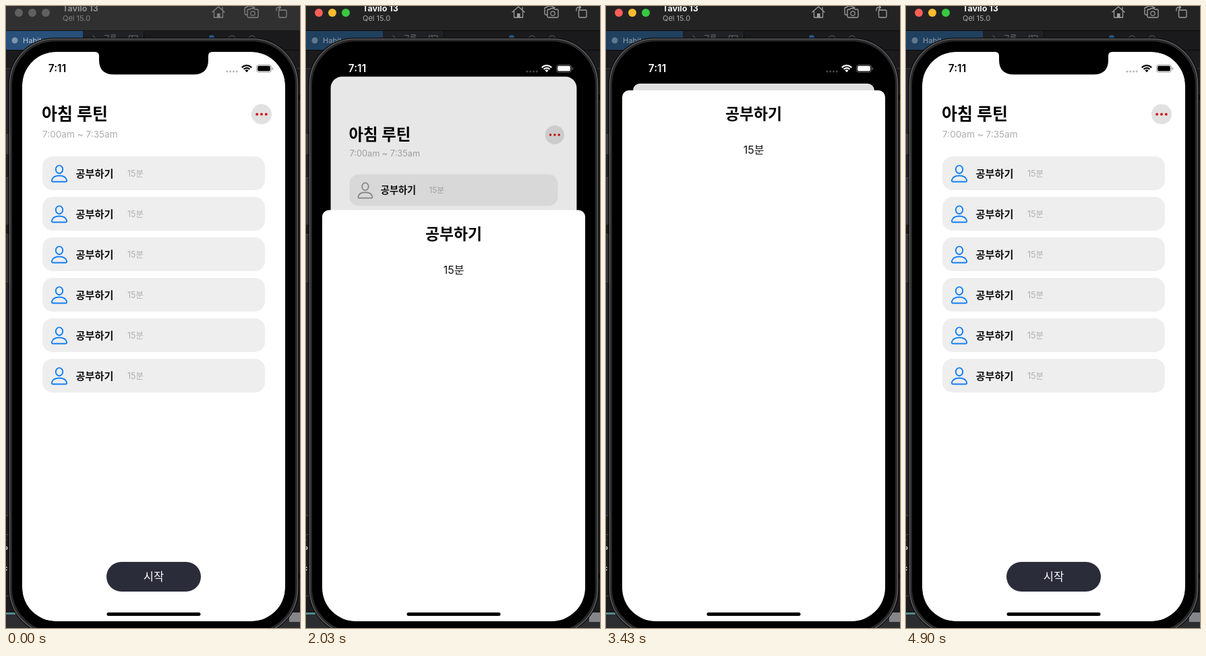
Animation of 436 by 922 pixels, one loop 5.6 s. Source, as an HTML page with a canvas:

```html
<!DOCTYPE html>
<html lang="ko">
<head>
<meta charset="utf-8">
<title>Routine sheet</title>
<style>
html, body { margin: 0; width: 100%; height: 100%; overflow: hidden; background: #1b1b1d; }
canvas { display: block; width: 436px; height: 922px; }
</style>
</head>
<body>
<canvas id="stage"></canvas>
<script>
const W = 436, H = 922, LOOP = 5600, STEP = 70;
const FONT = "Inter, 'Noto Sans CJK KR', 'Noto Sans CJK', sans-serif";
const SCREEN = { x: 24, y: 68, w: 390, h: 844, r: 50 };
const SHEET_TOP = 125, SHEET_HIDDEN = 912, MID = 219;
const ACTIVATE = 700;
const VISITS = [
  { tap: 840, show: 803, hide: 1981, row: 2 },
  { tap: 2870, show: 2879, hide: 4151, row: 3 }
];

const canvas = document.getElementById('stage');
const ctx = canvas.getContext('2d');
const dpr = window.devicePixelRatio || 1;
canvas.width = W * dpr;
canvas.height = H * dpr;

const clamp = v => Math.max(0, Math.min(1, v));
const mix = (a, b, k) => a + (b - a) * k;
const rgb = (r, g, b) => `rgb(${Math.round(r)},${Math.round(g)},${Math.round(b)})`;

// Critically damped spring, 0 to 1
function spring(ms, settle) {
  if (ms <= 0) return 0;
  if (ms >= settle) return 1;
  const x = ms * 0.01826;
  return 1 - (1 + x) * Math.exp(-x);
}

function rect(x, y, w, h, fill) {
  ctx.fillStyle = fill;
  ctx.fillRect(x, y, w, h);
}

function box(x, y, w, h, r, fill, stroke, width = 1) {
  ctx.beginPath();
  ctx.roundRect(x, y, w, h, r);
  if (fill) { ctx.fillStyle = fill; ctx.fill(); }
  if (stroke) { ctx.strokeStyle = stroke; ctx.lineWidth = width; ctx.stroke(); }
}

function dot(x, y, r, fill) {
  ctx.beginPath();
  ctx.arc(x, y, r, 0, Math.PI * 2);
  ctx.fillStyle = fill;
  ctx.fill();
}

function line(d, color, width) {
  ctx.strokeStyle = color;
  ctx.lineWidth = width;
  ctx.lineJoin = ctx.lineCap = 'round';
  ctx.stroke(new Path2D(d));
}

function text(str, x, y, size, weight, color, align = 'left') {
  ctx.font = `${weight} ${size}px ${FONT}`;
  ctx.textAlign = align;
  ctx.textBaseline = 'alphabetic';
  ctx.fillStyle = color;
  ctx.fillText(str, x, y);
}

function drawDesktop(active) {
  rect(0, 0, W, H, '#1b1b1d');

  // Editor window peeking out around the device
  rect(0, 37, 204, 28, '#202124');
  rect(205, 37, 231, 28, '#1a1a1c');
  rect(0, 37, 114, 28, active ? '#20405f' : '#28507a');
  dot(13, 51, 4.5, active ? '#63788c' : '#7f95aa');
  text('Habits', 25, 55, 11, 500, active ? '#8795a3' : '#aebccb');
  line('M129 44 L134 49', '#69696b', 1);
  text('구름', 144, 52, 11, 400, '#77777a');
  line('M183 44H195V51H183Z M187 44V51', '#69696b', 1);
  dot(305, 47, 4, '#255785');
  for (const x of [335, 365]) {
    ctx.beginPath();
    ctx.arc(x, 49, 5, 0, Math.PI * 2);
    ctx.strokeStyle = '#5a5a5c';
    ctx.lineWidth = 1;
    ctx.stroke();
  }
  rect(204, 37, 1, 28, '#0c0c0d');
  rect(0, 65, W, 1, '#0a0a0b');
  rect(0, 92, W, 1, '#38383a');
  rect(0, 93, 6, 97, '#22252d');
  rect(0, 190, 6, 30, '#3a3b40');
  rect(0, 221, 6, 33, '#20222a');
  rect(0, 254, 6, 70, '#36373c');
  rect(0, 338, 6, 70, '#34353a');
  rect(0, 409, 6, 346, '#22252d');
  for (const y of [190, 254, 338, 408, 755, 783, 874]) rect(0, y, 6, 1, '#4b4b4f');
  ['-', 'P', '/', 'c'].forEach((s, i) => text(s, -4, 795 + i * 14, 11, 600, '#d8d8d8'));
  rect(0, 899, W, 23, '#2b2d31');
  rect(0, 899, 14, 3, '#538b90');
  rect(420, 899, 16, 14, '#85868a');
  rect(433, 132, 3, 7, '#08080a');
  rect(433, 842, 3, 6, '#08080a');

  // Simulator title bar
  rect(0, 0, W, 37, active ? '#232324' : '#303030');
  rect(0, 36, W, 1, active ? '#0b0b0c' : '#171718');
  const lights = active ? ['#ff5f57', '#febc2e', '#38c840'] : Array(3).fill('#606060');
  lights.forEach((c, i) => dot(19 + i * 20, 10, 6, c));
  text('Tavilo 13', 84, 8, 12.5, 700, active ? '#f4f4f4' : '#8c8c8c');
  text('Qel 15.0', 84, 22, 11, 400, active ? '#acacac' : '#828282');

  const ink = active ? '#a0a0a0' : '#838383';
  line('M306 9L315 1L324 9 M308.5 8V17H321.5V8 M321 5V2', ink, 1.3);
  rect(313, 11, 4.5, 6.5, ink);
  line('M357.5 13H355.5Q354 13 354 11.5V3.5Q354 2 355.5 2H357L358.5 0H365L366.5 2H369', ink, 1.3);
  line('M360 5H362L363 3.5H368L369 5H372.5Q374 5 374 6.5V15.5Q374 17 372.5 17H359.5Q358 17 358 15.5V6.5Q358 5 360 5Z', ink, 1.3);
  line('M369.2 11A3.2 3.2 0 1 1 362.8 11A3.2 3.2 0 1 1 369.2 11', ink, 1.2);
  line('M406 6H414.5Q416 6 416 7.5V15.5Q416 17 414.5 17H406Q404.5 17 404.5 15.5V7.5Q404.5 6 406 6Z M401 7V5Q401 2 404 2H407 M404.5 -1L407.5 2L404.5 5', ink, 1.3);
}

function drawDevice() {
  box(4.5, 48, 429, 884, 68, '#29292a', '#0a0a0a', 2);
  box(5.5, 48.8, 427, 882.4, 67, null, '#636364', 1.3);
  box(9, 52.5, 420, 875, 64, '#000');
}

function drawPerson(x, y, color) {
  ctx.save();
  ctx.translate(x, y);
  ctx.beginPath();
  ctx.ellipse(0, -6.2, 5.2, 5.9, 0, 0, Math.PI * 2);
  ctx.strokeStyle = color;
  ctx.lineWidth = 1.9;
  ctx.stroke();
  line('M-9 12H9C11 12 11.5 10.8 11 9.2C9.8 5.4 5.4 3 0 3C-5.4 3 -9.8 5.4 -11 9.2C-11.5 10.8 -11 12 -9 12Z', color, 1.9);
  ctx.restore();
}

function drawRoutine(s) {
  const { x, y, w, h, r } = SCREEN;
  const k = 1 - s.open * 32 / w;
  const round = s.open === 0 ? r : s.closing ? mix(r, 10, s.open) : 11;
  ctx.save();
  ctx.translate(MID, y + 47 * s.open);
  ctx.scale(k, k);
  ctx.translate(-MID, -y);
  ctx.beginPath();
  ctx.roundRect(x, y, w, h, round);
  ctx.clip();
  rect(x, y, w, h, '#fff');

  text('아침 루틴', 53, 169.3, 25, 700, '#000');
  text('7:00am ~ 7:35am', 54, 194.5, 13.6, 400, '#adadad');
  dot(379, 160.5, 15, '#e1e1e2');
  for (const dx of [-6.8, 0, 6.8]) dot(379 + dx, 160.5, 1.9, '#d60a0a');

  const tint = rgb(mix(18, 148, s.tint), mix(126, 148, s.tint), mix(244, 148, s.tint));
  for (let i = 0; i < 6; i++) {
    const top = 223 + i * 60;
    if (i === s.row && s.glow > 0) {
      ctx.globalAlpha = s.glow;
      rect(54, top - 5, 330, 60, '#d2d2d5');
      ctx.globalAlpha = 1;
    }
    box(54, top, 330, 50, 15, '#eee');
    drawPerson(79, top + 25.5, tint);
    text('공부하기', 103.5, top + 30.7, 15.2, 700, '#111');
    text('15분', 180, top + 29.7, 12.5, 400, '#b0b0b0');
  }

  box(149, 824, 140, 44, 22, '#2b2c3a');
  text('시작', MID, 852.3, 16.5, 400, '#fff', 'center');
  rect(x, y, w, h, `rgba(0,0,0,${0.12 * s.open})`);
  ctx.restore();
}

function drawSheet(open) {
  if (open === 0) return;
  const top = mix(SHEET_HIDDEN, SHEET_TOP, open);
  box(SCREEN.x, top, SCREEN.w, H - top + 40, [10, 10, 0, 0], '#fff');
  text('공부하기', MID, top + 43, 22.8, 700, '#000', 'center');
  text('15분', MID, top + 94, 16, 400, '#111', 'center');
}

function drawStatus(light) {
  const v = 255 * light;
  const color = rgb(v, v, v);
  text('7:11', 76, 98.3, 15.4, 600, color, 'center');
  ctx.globalAlpha = 0.27;
  for (let i = 0; i < 4; i++) dot(328 + i * 4.7, 97, 1.6, color);
  ctx.globalAlpha = 1;

  const up = -Math.PI / 2, half = 0.82;
  ctx.lineCap = 'butt';
  ctx.strokeStyle = color;
  ctx.lineWidth = 2.3;
  for (const r of [9.8, 6.1]) {
    ctx.beginPath();
    ctx.arc(357, 98, r, up - half, up + half);
    ctx.stroke();
  }
  ctx.beginPath();
  ctx.moveTo(357, 98.3);
  ctx.arc(357, 98, 3.5, up - half, up + half);
  ctx.fillStyle = color;
  ctx.fill();

  ctx.globalAlpha = 0.4;
  box(371.5, 87.3, 22, 10.8, 3.3, null, color);
  box(394.7, 91, 1.4, 3.8, 0.7, color);
  ctx.globalAlpha = 1;
  box(373, 88.8, 19, 7.8, 2, color);
}

function drawNotch() {
  ctx.fillStyle = '#000';
  ctx.fill(new Path2D('M130 66V68H132Q138 68 138 74V80Q138 101.5 160 101.5H278Q300 101.5 300 80V74Q300 68 306 68H308V66Z'));
}

function stateAt(t) {
  const s = { open: 0, tint: 0, light: 0, glow: 0, row: -1, closing: false };
  for (const v of VISITS) {
    if (t < v.tap) continue;
    s.row = v.row;
    s.glow = clamp(1 - (t - v.tap - 100) / 300);
    s.closing = t >= v.hide;
    if (s.closing) {
      s.open = 1 - spring(t - v.hide, 700);
      s.tint = clamp(s.open * 1.3);
      s.light = 1 - clamp((t - v.hide - 40) / 450);
    } else {
      s.open = spring(t - v.show, 550);
      s.tint = s.open * 0.9;
      s.light = clamp((t - v.show) / 500);
    }
  }
  return s;
}

function render(t) {
  const s = stateAt(t);
  ctx.setTransform(dpr, 0, 0, dpr, 0, 0);
  drawDesktop(t >= ACTIVATE);
  drawDevice();
  ctx.save();
  ctx.beginPath();
  ctx.roundRect(SCREEN.x, SCREEN.y, SCREEN.w, SCREEN.h, SCREEN.r);
  ctx.clip();
  drawRoutine(s);
  drawSheet(s.open);
  drawNotch();
  drawStatus(s.light);
  box(149.5, 899, 139, 5, 2.5, '#000');
  ctx.restore();
}

const start = performance.now();
function tick() {
  const t = (performance.now() - start) % LOOP;
  render(Math.floor(t / STEP) * STEP);
  requestAnimationFrame(tick);
}
tick();
</script>
</body>
</html>
```
